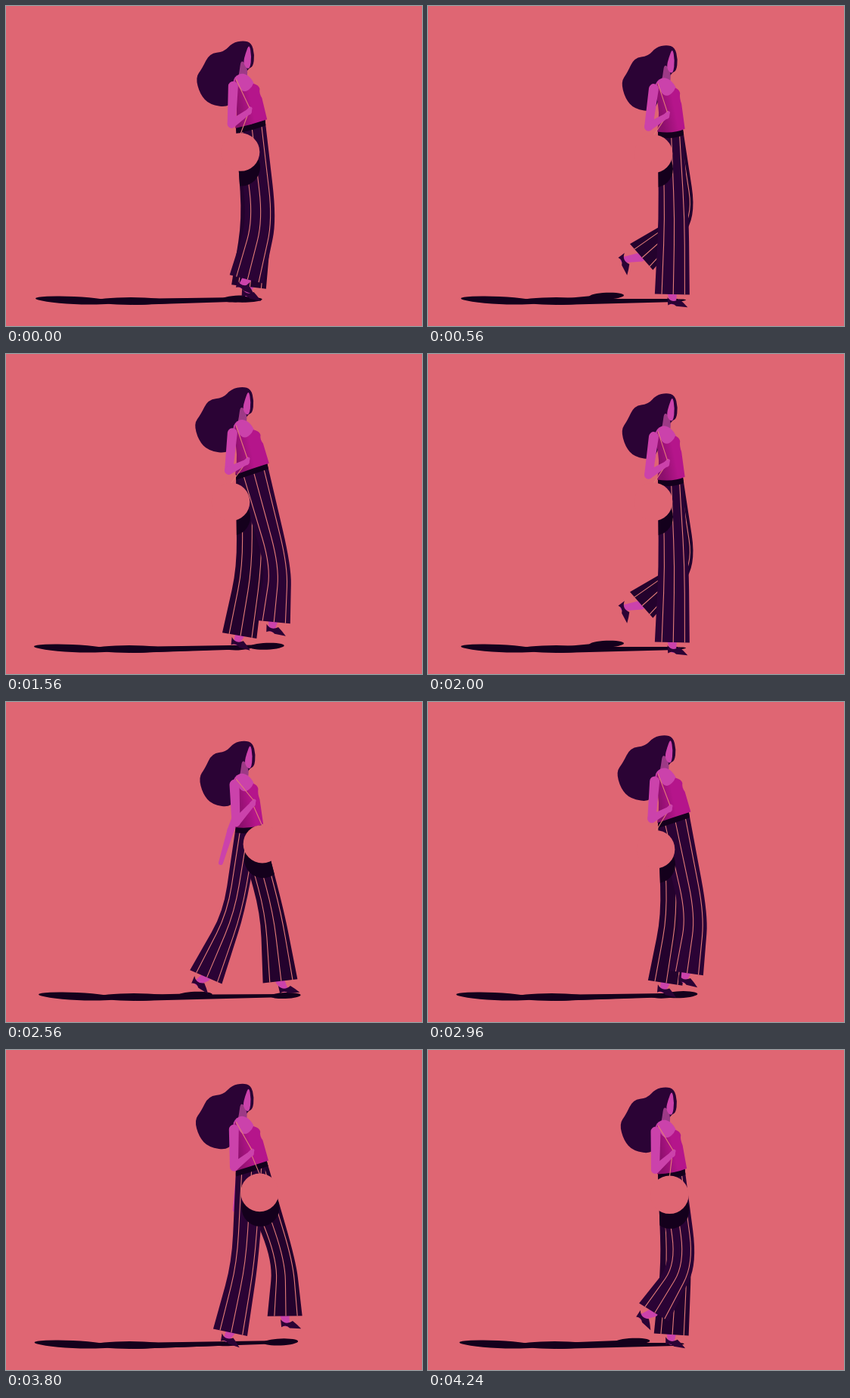
An HTML page with a canvas that plays this animation: 550x424 px, repeating every 4320 ms.

```html
<!DOCTYPE html>
<html lang="en">
<head>
<meta charset="utf-8">
<title>Walk cycle</title>
<style>
html, body { margin: 0; width: 100%; height: 100%; overflow: hidden; background: #df6673; }
canvas { display: block; }
</style>
</head>
<body>
<canvas id="stage" width="550" height="424"></canvas>
<script>
const ctx = document.getElementById('stage').getContext('2d');
const BG = '#df6673', DARK = '#2b0335', DEEP = '#24022d', BLACK = '#14001c';
const SKIN = '#cb42ab', SHADE = '#9d3a86', TOP = '#b5158b', TOP_SIDE = '#8c0f6c', LINE = '#e27c78';
const STRIDE = 1440, STEP = 40, LAST_STEP = 106, LOOP = 4320;
const HIP = [322, 165], LEG_LENGTH = 220, FLOOR = 390;

// The ankle's loop through one stride, in evenly spaced points
const ANKLE = [[318, 362], [366, 352], [370, 366], [325, 382], [321, 372], [300, 374], [265, 372], [279, 332]];
const HAIR = [[314, 47], [299, 50], [288, 62], [268, 64], [258, 84], [249, 96], [255, 118],
  [268, 132], [296, 136], [305, 114], [320, 84], [327, 82], [329, 66], [325, 50]];

const add = (a, x, y) => [a[0] + x, a[1] + y];
const mix = (a, b, u) => [a[0] + (b[0] - a[0]) * u, a[1] + (b[1] - a[1]) * u];
const wave = (t, peak, period = STRIDE) => Math.cos((t - peak) / period * 2 * Math.PI);

// Smooth closed curve through points, u in loops
function loopPoint(points, u) {
  const n = points.length, s = (u % 1) * n, i = Math.floor(s), f = s - i;
  const [a, b, c, d] = [-1, 0, 1, 2].map(k => points[(i + k + n) % n]);
  return [0, 1].map(k => b[k] + f / 2 * (c[k] - a[k] + f * (2 * a[k] - 5 * b[k] + 4 * c[k] - d[k]
    + f * (3 * (b[k] - c[k]) + d[k] - a[k]))));
}

function fill(path, color) {
  ctx.fillStyle = color;
  ctx.fill(path);
}

function stroke(path, color, width) {
  ctx.strokeStyle = color;
  ctx.lineWidth = width;
  ctx.stroke(path);
}

function blob(points, color) {
  const path = new Path2D(), n = points.length;
  path.moveTo(...mix(points[n - 1], points[0], .5));
  points.forEach((p, i) => path.quadraticCurveTo(...p, ...mix(p, points[(i + 1) % n], .5)));
  fill(path, color);
}

function disc(x, y, rx, ry, color, turn = 0) {
  const path = new Path2D();
  path.ellipse(x, y, rx, ry, turn, 0, 7);
  fill(path, color);
}

function limb(a, b, ra, rb, color) {
  const angle = Math.atan2(b[1] - a[1], b[0] - a[0]), q = Math.PI / 2;
  const path = new Path2D();
  path.arc(...a, ra, angle + q, angle + 3 * q);
  path.arc(...b, rb, angle - q, angle + q);
  fill(path, color);
}

function wire(a, b) {
  const path = new Path2D();
  path.moveTo(...a);
  path.lineTo(...b);
  stroke(path, LINE, 1.1);
}

// The knee bends forward by as much as the leg is shortened; hem and foot follow the shin
function poseLeg(t) {
  const ankle = loopPoint(ANKLE, t / STRIDE);
  const reach = ankle[0] - HIP[0];
  const slack = Math.max(0, LEG_LENGTH - Math.hypot(reach, ankle[1] - HIP[1]));
  const knee = add(mix(HIP, ankle, .53), slack * .8, slack * .6);
  const half = 20 - Math.abs(reach) * .1;
  const tilt = Math.atan2(knee[0] - ankle[0], ankle[1] - knee[1]);
  const cos = Math.cos(tilt), sin = Math.sin(tilt);
  return {
    ankle,
    knees: [add(knee, -half, 0), add(knee, half, 0)],
    hems: [add(ankle, -23 * cos, -23 * sin), add(ankle, 23 * cos, 23 * sin)],
    foot: add(ankle, 7 - 14 * sin - 22 * tilt, 5 + 7 * cos),
    turn: .2 + 1.2 * tilt
  };
}

function seam(path, from, knee, to) {
  path.lineTo(...from);
  path.lineTo(...mix(knee, from, .3));
  path.quadraticCurveTo(...knee, ...mix(knee, to, .35));
  path.lineTo(...to);
}

function drawLeg({ ankle, knees, hems, foot, turn }, waist, color) {
  limb(ankle, add(foot, -5 * Math.cos(turn), -5 * Math.sin(turn) - 1), 6, 4, SKIN);
  drawShoe(foot, turn);
  const path = new Path2D();
  seam(path, waist[0], knees[0], hems[0]);
  seam(path, hems[1], knees[1], waist[1]);
  path.closePath();
  fill(path, color);
  for (const u of [.2, .53, .86]) {
    const stripe = new Path2D();
    seam(stripe, ...[waist, knees, hems].map(([back, front]) => mix(back, front, u)));
    stroke(stripe, LINE, 1.1);
  }
  return path;
}

function drawShoe(foot, turn) {
  ctx.save();
  ctx.translate(...foot);
  ctx.rotate(turn);
  fill(new Path2D('M-14 -5Q-6 2 2 -6Q8 -3 15 2L0 4Q-6 0 -11 5Z'), DARK);
  ctx.restore();
}

function drawShadow(legs, dx) {
  disc(90 + dx, 390, 51, 5, BLACK, .05);
  disc(165 + dx, 391, 48, 5, BLACK);
  for (const { foot: [x, y] } of legs) {
    const lift = Math.max(0, FLOOR - y);
    const end = [x - lift * .5, FLOOR - lift * .12];
    limb([170 + dx, 392], end, 4, 2, BLACK);
    disc(...end, Math.min(23, 12 + lift), 1.5 + Math.min(3, lift * .3), BLACK, -.04);
  }
}

function drawHead(bob) {
  const move = p => add(p, bob * .3, bob);
  const sway = 2.5 + bob * .5;
  blob(HAIR.map(p => add(move(p), sway * Math.max(0, 315 - p[0]) / 65, 0)), DARK);
  blob([[311, 72], [319, 80], [320, 98], [306, 102], [309, 88]].map(move), SHADE);
  blob([[322, 51], [325, 68], [323, 84], [318, 84], [314, 76], [317, 64]].map(move), SKIN);
}

function drawTorso([waistB, waistF], bob) {
  const y = v => v + bob;
  const bust = [335 - bob * .4, y(111)];
  blob([[298, y(101)], [308, y(90)], [320, y(92)], [330, y(106)], [326, y(118)], [308, y(122)]], SKIN);
  const path = new Path2D();
  path.moveTo(303, y(97));
  path.bezierCurveTo(307, y(112), 315, y(121), 325, y(108));
  path.lineTo(327, y(104));
  path.quadraticCurveTo(bust[0] - 1, bust[1] - 5, ...bust);
  path.quadraticCurveTo(bust[0] - 1, bust[1] + 6, ...mix(bust, waistF, .3));
  path.lineTo(...waistF);
  path.quadraticCurveTo(325, waistF[1] + 7, ...waistB);
  path.quadraticCurveTo(308, y(135), 301, y(112));
  path.closePath();
  const cloth = ctx.createLinearGradient(304, 130, 324, 126);
  cloth.addColorStop(0, TOP_SIDE);
  cloth.addColorStop(1, TOP);
  fill(path, cloth);
}

function drawBelt([waistB, waistF]) {
  const path = new Path2D();
  path.moveTo(waistB[0], waistB[1] + 3);
  path.quadraticCurveTo(325, waistF[1] + 11, waistF[0], waistF[1] + 3);
  stroke(path, BLACK, 8);
}

function draw(t) {
  const bob = .7 + 4.5 * wave(t, 490, STRIDE / 2);
  const arm = wave(t, 1120), farArm = arm * Math.abs(arm), sling = wave(t, 1055);
  const hem = [[303, 163 + bob * .8], [344 - bob, 153 + bob * 2.2]];
  const waist = [add(hem[0], 1, -2), add(hem[1], -3, -2)];
  const bag = [313 + 27 * sling, 193 - 5 * sling];
  const shoulder = [300 + 2 * arm, 107 + bob * .6];
  const elbow = [297 + 7 * arm, 157 + bob * .7];
  const hand = [320 + 6 * arm, 141 - 6 * arm];
  const farElbow = [316 - 19 * farArm, 170];
  const near = poseLeg(t), far = poseLeg(t + STRIDE / 2);

  ctx.fillStyle = BG;
  ctx.fillRect(0, 0, 550, 424);
  drawShadow([far, near], 1 + bob * .8);
  limb([318, 112 + bob], farElbow, 5, 4.5, SKIN);
  limb(farElbow, [316 - 32 * farArm, 209 + 4 * arm], 4.5, 3, SKIN);

  const trousers = new Path2D();
  trousers.addPath(drawLeg(far, waist, DEEP));
  trousers.addPath(drawLeg(near, waist, DARK));
  ctx.save();
  ctx.clip(trousers);
  disc(bag[0] + 1, bag[1] + 20, 25, 25, BLACK);
  drawBelt(hem);
  ctx.restore();

  drawHead(bob);
  drawTorso(hem, bob);
  wire(hand, add(bag, 0, -24));
  disc(...bag, 25.3, 25.3, BG);
  limb(shoulder, elbow, 6.5, 5.5, SKIN);
  limb(elbow, hand, 5.5, 3.5, SKIN);
  limb(hand, add(hand, 2, -4), 4, 2.5, SKIN);
  wire([304, 98 + bob], add(hand, 1, -5));
}

function tick() {
  const step = Math.min(LAST_STEP, Math.floor(performance.now() % LOOP / STEP));
  draw(step * STEP);
  requestAnimationFrame(tick);
}
tick();
</script>
</body>
</html>
```
